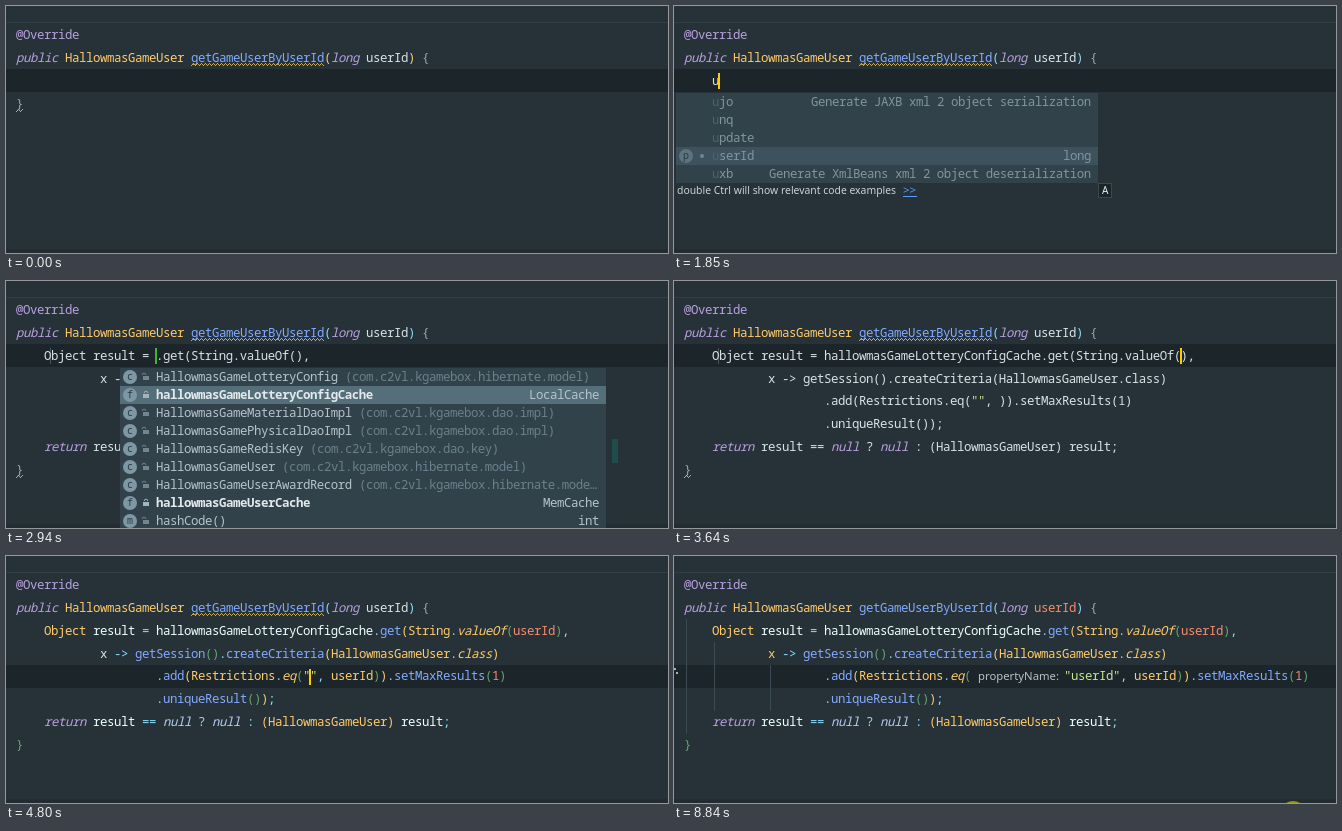
An HTML page with a canvas that plays this animation: 662 px wide and 247 px high, repeating every 8.9 s.

```html
<!DOCTYPE html>
<html lang="en">
<head>
<meta charset="utf-8">
<title>Code template completion</title>
<style>
html, body { margin: 0; width: 100%; height: 100%; overflow: hidden; background: #263238; }
canvas { display: block; }
</style>
</head>
<body>
<canvas id="stage" width="662" height="247"></canvas>
<script>
const ctx = document.getElementById('stage').getContext('2d');
const LOOP = 8900, CH = 7, ROW = 18, LINE = 23, SIZE = 12.4;
const MONO = '"Noto Sans Mono", "DejaVu Sans Mono", monospace';
const SANS = '"Noto Sans", "Open Sans", sans-serif';
const YELLOW = '#ffcc00';

// Markup: ^ plus a letter picks a colour, an upper-case letter is italic
const COLORS = {
  w: '#d6e3e6', k: '#b9a0e0', y: '#ffcb6b', b: '#82aaff', o: '#f78c6c',
  g: '#c3e88d', c: '#89ddff', e: '#62a86c', d: '#9aa9b0', n: '#b4cdf0', v: '#eeffff'
};

const sigHead = '^Kpublic ^yHallowmasGameUser ^bgetGameUserByUserId';
const SIG = {
  idle: sigHead + '^y(^Klong ^wuserId^y) ^d{',
  busy: sigHead + '^c(^Klong ^wuserId^c) ^d{',
  done: sigHead + '^c(^Klong ^ouserId^c) ^d{'
};
const CACHE = 'hallowmasGameLotteryConfigCache';
const PLAIN = {
  chain: '^wx -> getSession().createCriteria(HallowmasGameUser.class)',
  end: '^w.uniqueResult());',
  ret: '^Kreturn ^wresult == ^Knull ^w? ^Knull ^w: (HallowmasGameUser) result;'
};
const RICH = {
  chain: ' ^c-> ^bgetSession^e()^c.^bcreateCriteria^y(HallowmasGameUser^c.^Yclass^y)',
  end: '^c.^buniqueResult^e()^y)^c;',
  ret: '^Kreturn ^vresult ^c== ^Nnull ^c? ^Nnull ^c: ^y(HallowmasGameUser) ^vresult^c;'
};

const MODEL = '(com.c2vl.kgamebox.hibernate.model)';
const IMPL = '(com.c2vl.kgamebox.dao.impl)';
const LANG = '(java.lang)';

// Each row: icon, name, package, type on the right, bold
const LIST_U = [
  ['', 'ujo', '', 'Generate JAXB xml 2 object serialization'],
  ['', 'unq'],
  ['', 'update'],
  ['p', 'userId', '', 'long'],
  ['', 'uxb', '', 'Generate XmlBeans xml 2 object deserialization']
];
const LIST_UN = [
  ['', 'unq'],
  ['!', 'UnsupportedOperationException', LANG],
  ['!', 'UnknownError', LANG],
  ['!', 'UnsatisfiedLinkError', LANG],
  ['!', 'UnsupportedClassVersionError', LANG],
  ['!', 'UncheckedIOException', '(java.io)'],
  ['c', 'UnresolvedPermission', '(java.security)']
];
const LIST_CACHE = [
  ['c', 'HallowmasGameLotteryConfig', MODEL],
  ['f', CACHE, '', 'LocalCache', true],
  ['c', 'HallowmasGameMaterialDaoImpl', IMPL],
  ['c', 'HallowmasGamePhysicalDaoImpl', IMPL],
  ['c', 'HallowmasGameRedisKey', '(com.c2vl.kgamebox.dao.key)'],
  ['c', 'HallowmasGameUser', MODEL],
  ['c', 'HallowmasGameUserAwardRecord', '(com.c2vl.kgamebox.hibernate.mode…'],
  ['f', 'hallowmasGameUserCache', '', 'MemCache', true],
  ['m', 'hashCode()', '', 'int']
];
const LIST_VALUE = [
  ['!', 'UnsupportedOperationException', LANG],
  ['p', 'userId'],
  ['I', 'ValueOperations', '<K, V> (org.springframework.data.redis.core)'],
  ['f', 'valueOperations', '', 'ValueOperations', true],
  ['!', 'VerifyError', LANG],
  ['!', 'VirtualMachineError', LANG],
  ['*c', 'Void', LANG],
  ['', 'void', '', '', true],
  ['*m', 'wait()']
];

function rect(x, y, w, h, color) {
  ctx.fillStyle = color;
  ctx.fillRect(x, y, w, h);
}

function disc(x, y, r, color) {
  ctx.fillStyle = color;
  ctx.beginPath();
  ctx.arc(x, y, r, 0, Math.PI * 2);
  ctx.fill();
}

// Monospaced text keeps to the column grid
function mono(s, x, y, color, style = '') {
  ctx.font = `${style} ${SIZE}px ${MONO}`;
  ctx.letterSpacing = `${CH - SIZE * .6}px`;
  ctx.fillStyle = color;
  ctx.fillText(s, x, y);
}

function label(s, x, y, color, size, font = SANS) {
  ctx.font = `${size}px ${font}`;
  ctx.letterSpacing = '0px';
  ctx.fillStyle = color;
  ctx.fillText(s, x, y);
}

// Draws marked-up code and returns the x where it ends
function code(src, x, line) {
  const y = Math.round(33 + line * 22.85);
  for (const part of src.split('^').slice(1)) {
    const key = part[0], s = part.slice(1);
    const low = key.toLowerCase();
    mono(s, x, y, COLORS[low], key === low ? '' : 'italic');
    x += s.length * CH;
  }
  return x;
}

function squiggle(x0, x1, y) {
  for (let x = x0; x < x1; x++) rect(x, y + Math.abs((x - x0) % 4 - 2), 1, 1, '#c4ad5c');
}

function caret(x, line, color = YELLOW) {
  rect(x, 21 + line * LINE, 2, 16, color);
}

function lock(x, y, open, color) {
  rect(x - 3, y - 1, 6, 4, color);
  ctx.strokeStyle = color;
  ctx.lineWidth = 1;
  ctx.beginPath();
  ctx.arc(x - (open ? 2 : 0), y - 2, 1.8, Math.PI, 0);
  ctx.stroke();
}

function icon(kind, x, y, dim) {
  const ink = '#2b3a42', letter = kind.slice(-1);
  disc(x, y, 7, dim ? '#5c7480' : '#7d98a4');
  if (letter === '!') {
    ctx.fillStyle = ink;
    ctx.beginPath();
    [[1, -5], [-4, 1], [-.5, 1], [-1.5, 5], [4, -1], [.5, -1]].forEach(p => ctx.lineTo(x + p[0], y + p[1]));
    ctx.fill();
  } else {
    label(letter, x - 3, y + 3, ink, 10, MONO);
  }
  if (kind[0] === '*') label('*', x - 8, y + 1, '#dfe7ea', 11, MONO);
  if (letter === 'p') disc(x + 16, y, 2, dim ? '#6f858f' : '#93a9b3');
  else lock(x + 16, y, letter !== 'f', letter === 'f' ? '#a3b4bc' : '#72868f');
}

function popup(x, w, rows, sel, { dim = false, matched = 0 } = {}) {
  const main = dim ? '#81959e' : '#b6c4ca', faint = '#6a808b';
  ctx.save();
  ctx.beginPath();
  ctx.rect(x, 87, w, rows.length * ROW);
  ctx.clip();
  rect(x, 87, w, rows.length * ROW, '#32424a');
  rows.forEach(([kind, name, pkg = '', type = '', bold], i) => {
    const y = 96 + i * ROW, tx = x + 36;
    if (i === sel) rect(x, y - 9, w, ROW, dim ? '#3e525d' : '#546e7a');
    if (kind) icon(kind, x + 10, y, dim);
    mono(name.slice(0, matched), tx, y + 4, '#47656d');
    mono(name.slice(matched), tx + matched * CH, y + 4, bold ? '#e3eaed' : main, bold ? 'bold' : '');
    const gap = pkg[0] === '(' ? 1 : 0;
    mono(pkg, tx + (name.length + gap) * CH, y + 4, faint);
    mono(type, x + w - 7 - type.length * CH, y + 4, main);
  });
  ctx.restore();
}

function tip(y) {
  label('double Ctrl will show relevant code examples', 3, y + 10, '#c9d3d7', 10.4);
  label('>>', 229, y + 10, '#5a9cf8', 11.5);
  rect(229, y + 12, 14, 1, '#5a9cf8');
}

function templatePopup(t) {
  if (t < 1930) {
    popup(2, 422, LIST_U, 3, { dim: true, matched: 1 });
    tip(178);
    rect(424, 177, 14, 15, '#3a4950');
    rect(425, 178, 12, 13, '#1b2429');
    label('A', 428, 188, '#e8eef0', 10);
  } else if (t < 2080) {
    popup(2, 500, LIST_UN, 0, { dim: true, matched: 2 });
    tip(213);
  } else {
    popup(2, 500, [['', 'unq']], 0, { dim: true, matched: 3 });
    tip(105);
    if (t < 2160) {
      ctx.strokeStyle = '#12908a';
      ctx.lineWidth = 2;
      ctx.beginPath();
      ctx.arc(494, 95, 7, .3, 5.2);
      ctx.stroke();
    }
  }
}

function typing(t) {
  const typed = t < 1620 ? '' : t < 1930 ? 'u' : t < 2080 ? 'un' : 'unq';
  code('^w' + typed, 38, 2);
  code('^d}', 10, 3);
  squiggle(10, 17, 103);
  if ((t >= 390 && t < 920) || t >= 1620) caret(typed ? 37 + typed.length * CH : 38, 2);
  if (t >= 1850) templatePopup(t);
}

function guides() {
  const color = '#3b4b53';
  rect(12, 63, 1, 115, color);
  rect(40, 86, 1, 69, color);
  rect(96, 109, 1, 46, color);
}

function body(t) {
  const rich = t >= 4800, hinted = t >= 5730;
  const set = rich ? RICH : PLAIN;
  const arg = t >= 4480 ? 'userId' : '';
  const cache = t >= 3640 ? CACHE : '';
  const str = t >= 5430 ? 'userId' : '';

  if (t >= 5260) guides();
  code(rich
    ? `^yObject ^vresult ^c= ^v${cache}^c.^bget^y(String^c.^YvalueOf^e(^o${arg}^e)^c,`
    : `^wObject result = ${cache}.get(String.valueOf(${arg}),`, 38, 2);
  code(rich ? (t >= 5430 ? '^y' : '^w') + 'x' + set.chain : set.chain, 94, 3);

  let x = code(rich ? '^c.^badd^y(Restrictions^c.^Yeq^e(' : '^w.add(Restrictions.eq(', 150, 4);
  if (hinted) {
    label('propertyName:', 304, 124, '#b4c2c9', 11.3);
    x += 93;
  }
  const quote = x + CH;
  code(`^g"${str}"` + (rich
    ? `^c, ^y${arg}^e)^y)^c.^bsetMaxResults^e(^o1^e)`
    : `^w, ${arg})).setMaxResults(1)`), x, 4);

  code(set.end, 150, 5);
  code(set.ret, 38, 6);
  code(rich ? '^e}' : '^d}', 10, 7);
  if (!rich) squiggle(10, 17, 194);

  if (t < 3640) {
    caret(149, 2, t < 2940 ? YELLOW : '#3fb52f');
  } else if (t < 4480) {
    caret(506, 2, t < 4250 ? YELLOW : '#f01010');
    if (t >= 3790) rect(506, 63, 2, 4, YELLOW);
  } else if (t < 4570) {
    caret(548, 2);
  } else {
    const off = (t >= 6740 && t < 7290) || (t >= 7800 && t < 8290) || t >= 8750;
    if (!off) caret(quote - 1, 4);
  }

  if (t >= 2940 && t < 3640) {
    popup(114, 486, LIST_CACHE, 1);
    rect(606, 158, 6, 24, '#1f4d4b');
  }
  if (t >= 3790 && t < 4480) popup(349, 374, LIST_VALUE, 1);

  if (t >= 6360) {
    rect(0, 112, 2, 2, '#9fb0b8');
    rect(2, 116, 2, 2, '#9fb0b8');
  }
}

const mix = (a, b, k) => a + (b - a) * k;

function pointer(t) {
  const step = (from, to) => Math.min(1, Math.floor((t - from) / 76) * 76 / (to - from - 10));
  const halo = (x, y) => disc(x, y, 13, 'rgba(255,255,0,.5)');
  if (t >= 150 && t < 1700) {
    const k = step(150, 920);
    if (k < .7) halo(mix(149, 35, k / .7), mix(148, 74, k / .7));
    else halo(mix(35, 86, (k - .7) / .3), mix(74, 80, (k - .7) / .3));
  } else if (t >= 7450 && t < 8290) {
    const k = step(7450, 8290);
    halo(mix(143, 614, k), mix(98, 262, k));
  } else if (t >= 8840) {
    halo(619, 258);
  }
}

function draw(t) {
  rect(0, 0, 662, 247, '#263238');
  rect(0, 16, 662, 1, '#314047');
  rect(0, 243, 662, 4, '#222c31');
  rect(0, t < 4570 ? 63 : 109, 662, LINE, '#1c252a');
  code('^k@Override', 10, 0);
  code(t < 1620 ? SIG.idle : t < 5730 ? SIG.busy : SIG.done, 10, 1);
  if (t < 7900) squiggle(185, 318, 57);
  if (t >= 1930 && t < 4480) rect(44, 67, 1, 16, '#4a555b');
  if (t < 2620) typing(t); else body(t);
  pointer(t);
}

const start = performance.now();
function loop(now) {
  draw(Math.max(0, now - start) % LOOP);
  requestAnimationFrame(loop);
}
draw(0);
requestAnimationFrame(loop);
</script>
</body>
</html>
```
